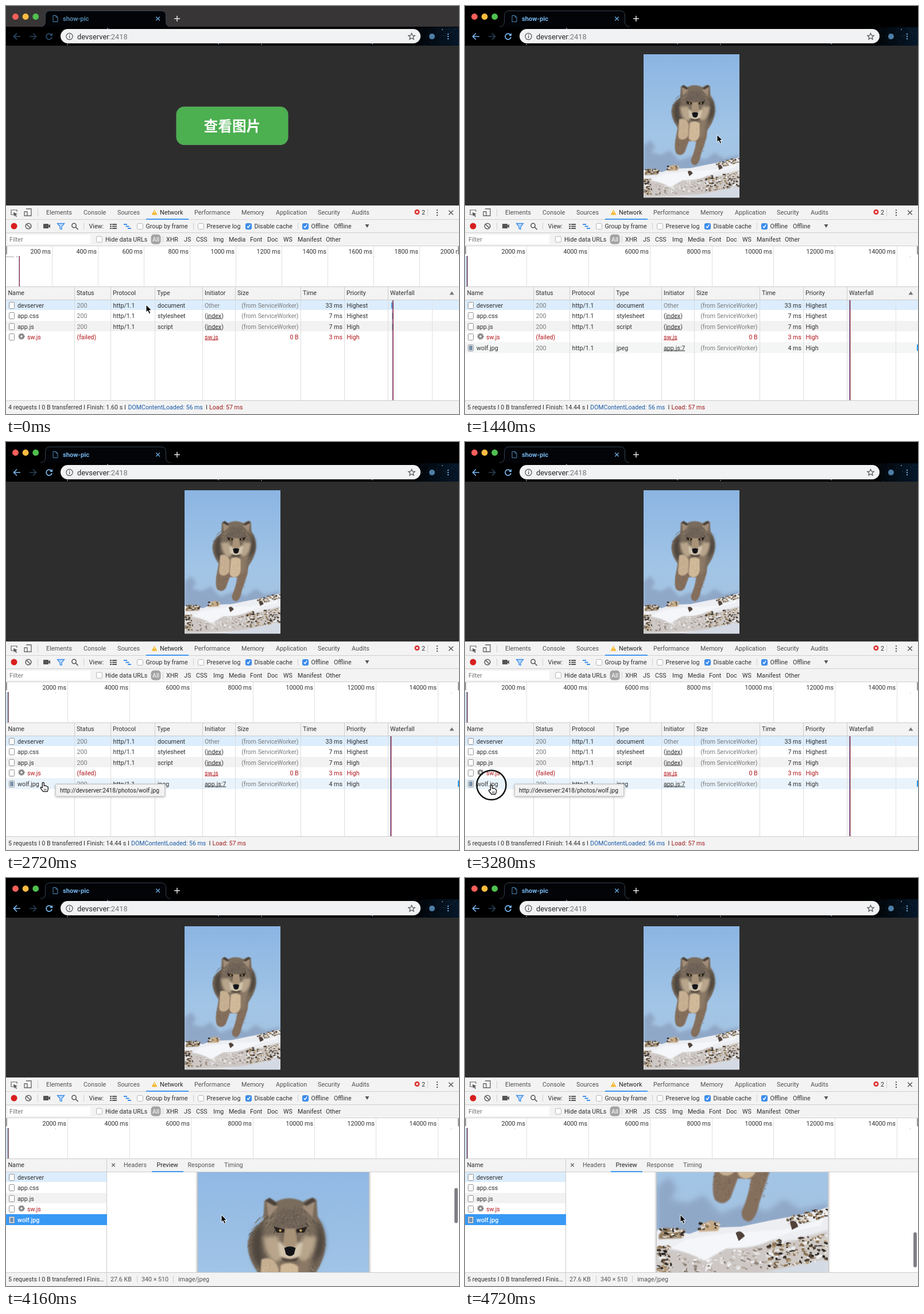
Animation, 789 px wide and 710 px high, one loop 4.8 s. Source, as an HTML page with a canvas:

```html
<!DOCTYPE html>
<html lang="zh">
<head>
<meta charset="utf-8">
<title>Offline image</title>
<style>
html, body { margin: 0; width: 100%; height: 100%; overflow: hidden; background: #2d2d2d; }
canvas { display: block; }
</style>
</head>
<body>
<canvas id="stage" width="789" height="710"></canvas>
<script>
const LOOP = 4800, STEP = 80;
const CLICK_BUTTON = 720, SHOW_IMAGE = 880, LEAVE_IMAGE = 1520;
const SHOW_TIP = 2080, CLICK_FILE = 3200, SHOW_PANEL = 3440;
const HOST = 'devserver', PORT = ':2418';
const RED = '#b0151a', BLUE = '#4297ee', INK = '#303030', GRAY = '#7b7b7b';
const c = document.getElementById('stage').getContext('2d');

function rect(x, y, w, h, color) { c.fillStyle = color; c.fillRect(x, y, w, h); }
function round(x, y, w, h, r, fill, line) {
  c.beginPath();
  c.roundRect(x, y, w, h, r);
  if (fill) { c.fillStyle = fill; c.fill(); }
  if (line) { c.strokeStyle = line; c.lineWidth = 1; c.stroke(); }
}
function disc(x, y, r, color) {
  c.fillStyle = color;
  c.beginPath(); c.arc(x, y, r, 0, 7); c.fill();
}
function ring(x, y, r, color, width = 1) {
  c.strokeStyle = color; c.lineWidth = width;
  c.beginPath(); c.arc(x, y, r, 0, 7); c.stroke();
}
function vline(x, y1, y2, color = '#d0d0d0') { rect(x, y1, 1, y2 - y1, color); }
function path(d, x, y, fill, line, width = 1) {
  const p = new Path2D(d);
  c.save();
  c.translate(x, y);
  if (fill) { c.fillStyle = fill; c.fill(p); }
  if (line) { c.strokeStyle = line; c.lineWidth = width; c.stroke(p); }
  c.restore();
}
function text(s, x, y, color = INK, size = 10.7, align = 'left', weight = 400) {
  c.font = `${weight} ${size}px Roboto, Inter, sans-serif`;
  c.textAlign = align;
  c.fillStyle = color;
  c.fillText(s, x, y);
}
function cross(x, y, r, color) {
  path(`M${-r} ${-r}L${r} ${r}M${r} ${-r}L${-r} ${r}`, x, y, null, color, 1.4);
}
function dots(x, y, gap, r, color) { for (const i of [-1, 0, 1]) disc(x, y + i * gap, r, color); }
function clipped(x, y, w, h, draw) {
  c.save();
  c.beginPath(); c.rect(x, y, w, h); c.clip();
  draw();
  c.restore();
}
function randomizer(seed) {
  return () => (seed = (seed * 16807) % 2147483647) / 2147483647;
}

// The picture: 167 x 250 units, painted once at preview size.
const SCALE = 298 / 167;
const picture = document.createElement('canvas');
picture.width = 298;
picture.height = 447;
function paintPicture() {
  const g = picture.getContext('2d'), rnd = randomizer(77);
  g.scale(SCALE, SCALE);
  const shape = (d, color, blur = 0) => {
    g.filter = blur ? `blur(${blur}px)` : 'none';
    g.fillStyle = color;
    g.fill(new Path2D(d));
    g.filter = 'none';
  };
  const fur = (n, x, y, rx, ry, colors, len) => {
    g.lineWidth = .7;
    g.globalAlpha = .6;
    for (let i = 0; i < n; i++) {
      const a = rnd() * 6.283, r = Math.sqrt(rnd());
      const px = x + rx * r * Math.cos(a), py = y + ry * r * Math.sin(a);
      g.strokeStyle = colors[Math.floor(rnd() * colors.length)];
      g.beginPath();
      g.moveTo(px, py);
      g.lineTo(px + (px - x) / rx * len, py + len * .7);
      g.stroke();
    }
    g.globalAlpha = 1;
  };
  const blot = (n, x, y, w, h, colors, slope = 0) => {
    for (let i = 0; i < n; i++) {
      const u = rnd();
      g.fillStyle = colors[i % colors.length];
      g.beginPath();
      g.ellipse(x + u * w, y + rnd() * h + u * slope, .6 + rnd() * 2.2, .4 + rnd(), -.3 + rnd() * .8, 0, 7);
      g.fill();
    }
  };
  const sky = g.createLinearGradient(0, 0, 0, 210);
  sky.addColorStop(0, '#8cb5e3');
  sky.addColorStop(.65, '#a2c5e6');
  sky.addColorStop(1, '#a5c2e0');
  g.fillStyle = sky;
  g.fillRect(0, 0, 167, 250);
  shape('M0 160L12 150 20 162 14 172 30 176 46 168 62 186 84 178 108 184 124 172 140 182 167 176V196L0 212Z', '#90a8c8', 5);

  // Hind legs, head and ruff, face, front paws.
  shape('M60 126L56 148Q53 166 57 173Q65 180 72 171L79 152H92Q90 168 83 184Q82 193 90 194Q97 192 100 176L110 146 112 128Z', '#846e5c', 1);
  fur(90, 64, 156, 8, 17, ['#6f5b4b', '#96806b'], 2);
  fur(80, 99, 154, 8, 20, ['#6f5b4b', '#96806b'], 2);
  shape('M64 76L65 57Q70 53 76 58Q89 51 103 58Q112 52 116 56L117 72Q127 88 124 105Q122 120 109 136L84 142 62 132Q47 112 49 96Q53 84 64 76Z', '#7a6c5d', 1);
  fur(420, 87, 97, 35, 37, ['#49423b', '#8b7b68', '#a5927a', '#5b5148', '#6f6255'], 4);
  shape('M55 86L64 78 62 100 67 124 58 120Q49 108 55 86ZM118 76Q127 92 122 108L112 122 115 100Z', '#4d453d', 4);
  shape('M67 58Q72 56 78 63L69 73ZM102 63Q111 54 114 59L112 73Z', '#a08c78', 1);
  shape('M66 57L70 54 78 60 75 62ZM115 57L112 54 103 60 106 62Z', '#4a423b', 1);
  shape('M64 92L78 91 84 112 76 118Q66 112 64 92ZM116 92L103 91 97 112 104 118Q114 110 116 92Z', '#b8a58b', 3);
  shape('M78 68Q90 62 102 68L106 82 95 90 85 90 74 82Z', '#6f6257', 2);
  fur(110, 90, 78, 17, 13, ['#453e38', '#938371', '#6a5d51'], 2);
  shape('M85 84L95 84 98 102Q99 112 90 114Q81 112 83 102Z', '#a89379', 1);
  shape('M78 98Q82 95 85 103L95 103Q98 95 103 98L100 111Q90 117 80 111Z', '#d3c5ae', 2);
  shape('M74 82L85 85 84 88 77 88ZM107 82L96 85 97 88 104 88Z', '#29231f');
  g.fillStyle = '#d0ae62';
  for (const x of [80.5, 100.5]) { g.beginPath(); g.arc(x, 86, 1.2, 0, 7); g.fill(); }
  shape('M84.500 103Q90 100 95.500 103L94 109Q90 113 86 109Z', '#121317');
  shape('M81 112Q90 116 99 112L96 116H84Z', '#50463d', 1);
  shape('M72 117L90 119 110 115 105 146 80 148Z', '#8b7865', 3);
  shape('M62 114Q75 110 79 124L78 143Q71 152 63 148Q59 146 61 134Z', '#c6af91', 1);
  shape('M81 120Q90 115 98 121L98 140Q96 152 87 152Q78 151 79 143Z', '#d0b999', 1);
  fur(60, 70, 130, 6, 13, ['#d6c2a5', '#b29b7f'], 2);
  fur(60, 89, 134, 7, 13, ['#dcc9ab', '#bca486'], 2);

  // Snowy birch trunk.
  shape('M0 203L15 203 32 206 48 200 82 199 110 193 147 186 167 180V250H0Z', '#eceef2');
  shape('M0 219L36 224 48 232 68 219 105 210 126 214 167 203V232L100 246 0 250Z', '#cdc8c5', 2);
  shape('M70 250L110 243 167 230V250Z', '#d3dae4', 2);
  const bark = ['#493c31', '#8e7557', '#d5cdc4', '#272421', '#b29c7c', '#eeeeef'];
  shape('M2 207L8 200 28 202 25 210 2 211Z', '#8f7859', 1);
  shape('M41 204L44 196 53 193 62 195 60 203Z', '#c5a984', 1);
  blot(45, 2, 201, 25, 8, bark);
  blot(18, 41, 195, 19, 7, bark);
  blot(90, 127, 190, 40, 10, bark, -10);
  blot(210, 108, 214, 58, 26, bark, -8);
  blot(90, 0, 217, 14, 27, bark);
  blot(110, 20, 226, 95, 20, ['#b5aaa0', '#e3e0dd', '#8d8178', '#f0f0f2'], -8);
  shape('M28 212Q65 204 105 203T164 189L160 198Q130 203 112 212T68 220L46 232Q34 225 14 220Z', '#f4f6f9', 1);
  shape('M77 205Q82 201 86 208L80 213ZM130 194Q136 191 138 199L132 202Z', '#51423a');
}
paintPicture();

function drawBrowser(focused) {
  const bright = focused ? '#79b9f0' : '#2c4e6b', dim = '#294256';
  rect(0, 0, 789, 69, '#000');
  if (!focused) rect(0, 0, 789, 36, '#383536');
  path('M60 36Q68 36 68.5 28V16Q69 8.500 77 8.500H270Q278 8.500 278.500 16V28Q279 36 287 36', 0, 0, '#020408', '#34424f');
  const glow = c.createLinearGradient(700, 0, 789, 0);
  glow.addColorStop(0, '#000');
  glow.addColorStop(1, '#06182a');
  c.fillStyle = glow;
  c.fillRect(700, 37, 89, 32);
  const rnd = randomizer(31);
  for (let i = 0; i < 24; i++) rect(724 + rnd() * 64, 38 + rnd() * 30, 1, 1, '#24445f');
  for (const [x, y] of [[107, 67], [177, 39], [370, 66], [445, 67], [638, 66], [760, 41]]) disc(x, y, .9, '#8fa6ba');

  ['#fc5f5b', '#fdbc40', '#50c04f'].forEach((color, i) => disc(16.5 + 17.600 * i, 18.500, 5.4, color));
  path('M-4 -5.500H1L4 -2.500V5.500H-4ZM1 -5.500V-2.500H4', 86, 22, null, '#4f89b8');
  text('show-pic', 99, 26, focused ? '#76b7ee' : '#5f9ac5', 11.2, 'left', focused ? 700 : 500);
  cross(264.5, 22, 3.3, '#69a9da');
  path('M-5 0H5M0 -5V5', 298, 22, null, '#e6e6e6', 1.5);

  const arrow = 'M6 0H-5M0 -5.500L-5.500 0L0 5.500';
  path(arrow, 19, 53, null, bright, 1.7);
  c.save();
  c.translate(47, 53);
  c.scale(-1, 1);
  path(arrow, 0, 0, null, dim, 1.7);
  c.restore();
  path('M4 -3A5 5 0 1 0 5 1', 75, 53, null, bright, 1.7);
  path('M6 -6V-1H1Z', 75, 53, bright);
  round(95, 40, 627, 25, 12.5, '#f1f2f3');
  ring(110.5, 53, 5.6, '#555', 1.2);
  rect(110, 52, 1.3, 4, '#555');
  rect(110, 49.5, 1.3, 1.5, '#555');
  text(HOST, 124, 57.500, '#24272a', 12.9);
  text(PORT, 124 + c.measureText(HOST).width, 57.500, '#777', 12.9);
  path('M0 -5.600L1.700 -1.900 5.700 -1.600 2.600 1 3.600 5 0 2.900 -3.600 5 -2.600 1 -5.700 -1.600 -1.700 -1.900Z', 706.5, 53, null, '#555', 1.2);
  disc(742, 53, 5, '#4e7ea6');
  dots(770, 53, 4, 1.2, '#6da4d2');
}

function drawPage(showImage) {
  rect(0, 69, 789, 279, '#2d2d2d');
  if (showImage) {
    c.imageSmoothingQuality = 'high';
    c.drawImage(picture, 311, 83.5, 166.500, 250);
    return;
  }
  round(296.5, 175, 195, 67, 14, '#4caf50');
  c.setLineDash([1, 2]);
  round(296.5, 175.500, 195, 66, 14, null, '#7a787c');
  c.setLineDash([]);
  c.font = '700 24.700px "Noto Sans CJK SC", "Noto Sans CJK", "Noto Sans CJK JP", sans-serif';
  c.textAlign = 'center';
  c.fillStyle = '#fff';
  c.fillText('查看图片', 394, 218);
}

function checkbox(x, y, on) {
  round(x - 5, y - 5, 10, 10, 2, on ? '#3d8ff0' : '#fff', on ? '#3582df' : '#b5b5b5');
  if (on) path('M-2.500 0L-.700 2.200 2.700 -2.800', x, y, null, '#fff', 1.5);
}

function drawToolbar() {
  rect(0, 347, 789, 70, '#f3f3f3');
  for (const y of [347, 371, 394, 417]) rect(0, y, 789, 1, '#d0d0d0');
  path('M3 3H-5V-5H5V-2', 14, 360, null, '#666', 1.2);
  path('M-1 -1L6 2 3 3 5 6 3.500 7 1.500 4 0 6Z', 14, 360, '#555');
  path('M-3 -6H6V6H-1M-6 -1H-1V6H-6Z', 38, 359, null, '#666', 1.3);
  vline(55, 353, 366);
  const tabs = [['Elements', 70], ['Console', 135], ['Sources', 194], ['Network', 268], ['Performance', 328],
    ['Memory', 410], ['Application', 470], ['Security', 543], ['Audits', 602]];
  for (const [s, x] of tabs) text(s, x, 363, s === 'Network' ? '#222' : '#4f4f4f', 10.8);
  path('M0 -5L5 4H-5Z', 258.5, 359.500, '#f4b92f');
  rect(258, 357, 1, 3, '#fff');
  rect(244, 370, 74, 2, BLUE);
  disc(716, 358.500, 4.5, '#db2f2f');
  cross(716, 358.500, 1.6, '#fff');
  text('2', 724, 363);
  vline(734, 353, 366);
  dots(751, 359.500, 4.4, 1.2, '#555');
  cross(775, 359.500, 3.8, '#555');

  disc(14, 383, 5.5, '#d81e1e');
  ring(39, 383, 4.8, '#5c5c5c', 1.6);
  path('M-3 -3L3 3', 39, 383, null, '#5c5c5c', 1.6);
  path('M-6 -4H3V-1L6 -3.500V3.500L3 1V4H-6Z', 71, 383, '#555');
  path('M-6 -5H6L1.500 .500V5L-1.500 4V.500Z', 95.5, 383.500, '#c0dcf9', '#3b8de8', 1.3);
  ring(118.5, 382, 3.7, '#555', 1.5);
  path('M0 0L4 4', 121.5, 385, null, '#555', 1.7);
  for (const x of [55, 135, 326, 508]) vline(x, 377, 389);
  text('View:', 144.5, 387);
  for (const y of [379, 382.500, 386]) {
    rect(181, y, 3, 2, '#555');
    rect(185, y, 8, 2, '#555');
  }
  for (let i = 0; i < 3; i++) rect(205 + 3.500 * i, 379 + 3.500 * i, 6, 2, '#3b8de8');
  const boxes = [['Group by frame', 233], ['Preserve log', 339], ['Disable cache', 422, true], ['Offline', 521, true]];
  for (const [s, x, on] of boxes) {
    checkbox(x + .5, 383.500, on);
    text(s, x + 10.500, 387);
  }
  text('Offline', 571, 387);
  path('M-3.500 -3H3.500L0 3Z', 629, 383, '#555');

  rect(3, 398, 144, 16, '#fff');
  text('Filter', 6, 410, '#777');
  checkbox(162.5, 406);
  text('Hide data URLs', 173, 409.500);
  round(252.5, 397.500, 17, 17, 5, '#a3a3a3');
  text('All', 261, 409.500, '#fff', 10.7, 'center');
  vline(273, 400, 412);
  const filters = [['XHR', 279], ['JS', 310], ['CSS', 331], ['Img', 361], ['Media', 388], ['Font', 425],
    ['Doc', 455], ['WS', 483], ['Manifest', 508], ['Other', 557]];
  for (const [s, x] of filters) text(s, x, 409.500);
}

function drawTimeline(loaded) {
  rect(0, 418, 789, 70, '#fff');
  const gap = loaded ? 107.400 : 80, unit = loaded ? 2000 : 200;
  for (let i = 1; i * gap < 810; i++) {
    const x = Math.round(i * gap);
    vline(x, 418, 488, '#e0e0e0');
    text(i * unit + ' ms', x - 2, 430.500, INK, 10.7, 'right');
  }
  rect(0, 418, 2, 14, '#999');
  rect(787, 418, 2, 14, '#999');
  if (loaded) {
    vline(1, 435, 488, '#8fb8e0');
    rect(3, 435, 1.5, 53, '#4e2945');
    rect(86, 436, 1, 1, '#999');
    rect(775, 436, 1, 1, '#999');
  } else {
    rect(0, 436, 14, 1, '#aaa');
    rect(17, 436, 4, 1, '#aaa');
    rect(640, 436, 1, 1, '#999');
    vline(22, 435, 488, '#b7a5c9');
    vline(23, 435, 488, '#8c2836');
  }
}

const FILES = [
  [HOST, '200', 'http/1.1', 'document', 'Other', '33 ms', 'Highest'],
  ['app.css', '200', 'http/1.1', 'stylesheet', '(index)', '7 ms', 'Highest'],
  ['app.js', '200', 'http/1.1', 'script', '(index)', '7 ms', 'High'],
  ['sw.js', '(failed)', '', '', 'sw.js', '3 ms', 'High'],
  ['wolf.jpg', '200', 'http/1.1', 'jpeg', 'app.js:7', '4 ms', 'High']
];
const rowTop = i => 512 + Math.round(18.400 * i);

function link(s, x, y, color) {
  text(s, x, y, color);
  const inset = s[0] === '(' ? c.measureText('(').width : 0;
  rect(x + inset, y + 1, c.measureText(s).width - 2 * inset, 1, color);
}

function drawName(i, selected) {
  const y = rowTop(i), failed = i === 3;
  round(5.5, y + 3.500, 9, 11, 1, '#fff', '#909090');
  if (i === 4) rect(7, y + 5, 6, 8, '#7791ad');
  if (failed) {
    c.setLineDash([1.5, 1.2]);
    ring(27, y + 8, 4.7, '#777', 2);
    c.setLineDash([]);
    ring(27, y + 8, 3, '#777', 2);
  }
  text(FILES[i][0], failed ? 37 : 20, y + 12.500, selected ? '#fff' : failed ? RED : INK, 10.7, 'left', selected ? 500 : 400);
}

function drawDetails(i) {
  const [, status, proto, type, from, time, priority] = FILES[i];
  const y = rowTop(i) + 12.500, failed = i === 3, color = failed ? RED : INK;
  text(status, 123.5, y, failed ? RED : GRAY);
  text(proto, 186.5, y);
  text(type, 264, y);
  if (i) link(from, 346, y, color); else text(from, 346, y, GRAY);
  text(failed ? '0 B' : '(from ServiceWorker)', 509.5, y, failed ? RED : GRAY, 10.5, 'right');
  text(time, 586, y, color, 10.7, 'right');
  text(priority, 593.5, y, color);
}

function drawTable(loaded, hover, panel) {
  rect(0, 488, 789, 198, '#fff');
  const count = loaded ? 5 : 4, width = panel ? 176 : 789;
  const fills = ['#dcedfd', '#fff', '#f2f2f2', '#fff', panel ? '#3899f5' : hover ? '#e9f3fb' : '#f4f6f6'];
  for (let i = 0; i < count; i++) rect(0, rowTop(i) - 1, width, 19, fills[i]);
  rect(0, 488, 789, 24, '#f3f3f3');
  rect(0, 488, 789, 1, '#ccc');
  rect(0, 511, 789, 1, '#ccc');
  text('Name', 3.5, 503);
  if (!panel) {
    const heads = [['Status', 119], ['Protocol', 182], ['Type', 259], ['Initiator', 342], ['Size', 399],
      ['Time', 513], ['Priority', 589], ['Waterfall', 665]];
    for (const [s, x] of heads) {
      vline(x, 489, 511, '#ccc');
      vline(x, 512, 686, '#dcdcdc');
      text(s, x + 4, 503);
    }
    path('M0 -3L4 3H-4Z', 776.5, 499.500, '#777');
    vline(loaded ? 750 : 742, 512, 686, '#e2e2e2');
    const x = loaded ? 670 : 673.500;
    for (let i = 0; i < 3; i++) rect(x - 1, rowTop(i) + 4, 2, 11, '#36847f');
    if (!loaded) rect(671, 516, 2.5, 10, BLUE);
    vline(x - 1, 512, 686, '#8c91cf');
    rect(x, 512, 1.4, 174, '#8c2941');
    if (loaded) rect(787, 589, 2, 11, '#289bf5');
  }
  for (let i = 0; i < count; i++) {
    drawName(i, panel && i === 4);
    if (!panel) drawDetails(i);
  }
}

function drawStatus(loaded, panel) {
  rect(0, 686, 789, 24, '#f3f3f3');
  rect(0, 686, 789, 1, '#ccc');
  if (panel) {
    text('5 requests I 0 B transferred I Finis…', 4, 702);
    for (const x of [175, 228, 291]) vline(x, x === 175 ? 686 : 692, x === 175 ? 710 : 704, '#ccc');
    text('27.6 KB', 182, 701.500, '#555');
    text('340 × 510', 236, 701.500, '#555');
    text('image/jpeg', 300, 701.500, '#555');
    return;
  }
  const shift = loaded ? 5.500 : 0;
  text(`${loaded ? 5 : 4} requests I 0 B transferred I Finish: ${loaded ? '14.44' : '1.60'} s I`, 4, 702);
  text('DOMContentLoaded: 56 ms', 212.5 + shift, 702, '#1a5ba8', 10.6);
  text('I', 348 + shift, 702);
  text('Load: 57 ms', 354 + shift, 702, '#a01b1b');
}

function drawPanel(scroll) {
  vline(175, 488, 585, '#ccc');
  vline(175, 604, 686, '#ccc');
  cross(187, 499.500, 2.7, '#666');
  for (const [s, x] of [['Headers', 205], ['Preview', 262.500], ['Response', 316.500], ['Timing', 380]])
    text(s, x, 503, s === 'Preview' ? '#222' : '#555');
  rect(254, 510, 55, 2, BLUE);
  clipped(176, 512, 613, 174, () => {
    c.save();
    c.shadowColor = 'rgba(0,0,0,.55)';
    c.shadowBlur = 5;
    c.shadowOffsetY = 1;
    c.drawImage(picture, 334, 530 - scroll);
    c.restore();
    if (scroll > 0) round(781, 513.500 + scroll * .37, 6, 61, 3, '#7f7f86');
  });
}

function scrollAt(t) {
  const start = 3840, ramp = 264, speed = .372, d = Math.max(0, t - start);
  return d < ramp ? speed * d * d / (2 * ramp) : speed * (d - ramp / 2);
}

const POINTER = [[0, 244, 520], [160, 244, 520], [640, 439, 224], [LEAVE_IMAGE, 439, 224], [1920, 75, 590],
  [2560, 75, 590], [2960, 46, 597], [SHOW_PANEL, 46, 597], [3720, 375, 586], [LOOP, 375, 586]];
function pointerAt(t) {
  const i = POINTER.findIndex(key => key[0] > t);
  const [t1, x1, y1] = POINTER[i - 1], [t2, x2, y2] = POINTER[i];
  const u = (t - t1) / (t2 - t1), e = u * u * (3 - 2 * u);
  return [x1 + (x2 - x1) * e, y1 + (y2 - y1) * e];
}

function drawPointer(x, y, hand) {
  c.lineJoin = 'round';
  if (hand) {
    path('M-1.500 1Q0 -1 1.500 1V6L3 5.500 5 6 7 7 8.500 8V12L7 16H0L-4.500 10Q-5 7 -1.500 9Z', x, y, '#fff', '#111', 1.3);
    path('M2 11V14M4.500 11V14', x, y, null, '#111');
  } else {
    path('M0 0V13L3 10.300 5.200 15.500 7.700 14.400 5.500 9.500H9.500Z', x, y, '#000', '#fff', 1);
  }
  c.lineJoin = 'miter';
}

function drawTooltip() {
  c.save();
  c.shadowColor = 'rgba(0,0,0,.35)';
  c.shadowBlur = 4;
  c.shadowOffsetY = 1;
  round(86.5, 595.500, 190, 21, 1, '#f2f2f2');
  c.restore();
  round(86.5, 595.500, 190, 21, 1, null, '#c4c4c4');
  text(`http://${HOST}${PORT}/photos/wolf.jpg`, 94, 610, '#222', 10.2);
}

function draw(t) {
  const focused = t >= CLICK_BUTTON, loaded = t >= SHOW_IMAGE, panel = t >= SHOW_PANEL;
  const [x, y] = pointerAt(t);
  const overRow = loaded && !panel && y >= 585 && y < 604;
  const overButton = !loaded && y < 242 && x > 297;
  drawBrowser(focused);
  drawPage(loaded);
  drawToolbar();
  drawTimeline(loaded);
  drawTable(loaded, overRow, panel);
  if (panel) drawPanel(scrollAt(t));
  drawStatus(loaded, panel);
  if (t >= SHOW_TIP && !panel) drawTooltip();
  const clicking = [CLICK_BUTTON, CLICK_FILE].some(start => t >= start && t < start + 160);
  if (clicking) ring(x, y, 25.5, '#111', 2.5);
  drawPointer(x, y, overButton || (overRow && x < 119));
}

function tick(now) {
  draw(Math.floor(now % LOOP / STEP) * STEP);
  requestAnimationFrame(tick);
}
draw(0);
requestAnimationFrame(tick);
</script>
</body>
</html>
```
